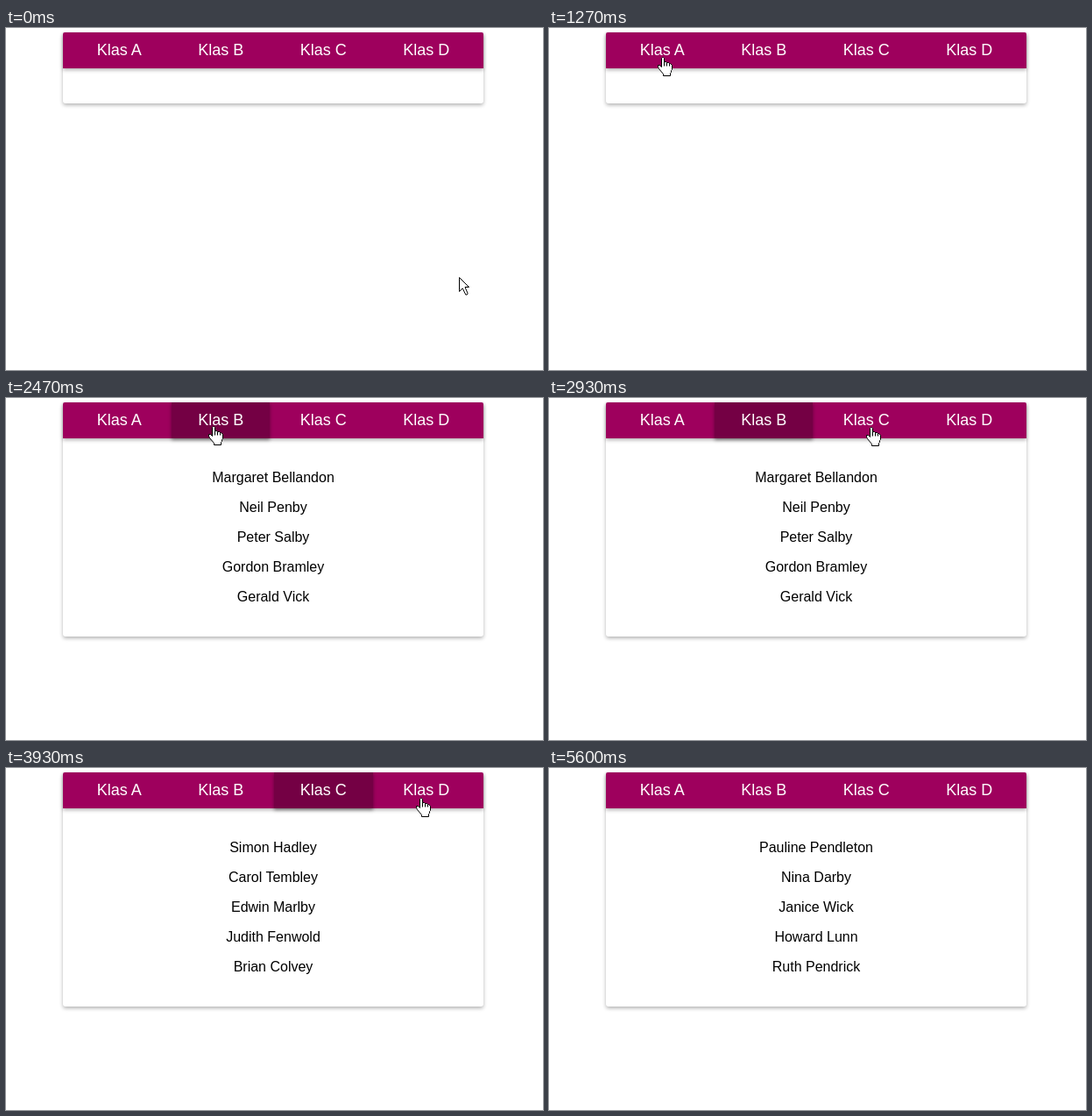
Recreate the animation shown at these times as an HTML page. Size 613x390 px, loop 5670 ms.

```html
<!DOCTYPE html>
<html lang="nl">
<head>
<meta charset="utf-8">
<title>Klassen</title>
<style>
  html, body { margin: 0; width: 100%; height: 100%; overflow: hidden; background: #fff; }
  body { position: relative; font-family: Arial, "Liberation Sans", sans-serif; }
  #card, #bar, svg { position: absolute; }
  #card, #bar { left: 65px; top: 5px; width: 480px; box-shadow: 0 2px 4px rgba(0,0,0,.3); }
  #card { height: 81px; border-radius: 3px; background: #fff; }
  #card.open { height: 267px; }
  #bar {
    display: flex; justify-content: center; gap: 4.45px;
    height: 41px; border-radius: 2px 2px 0 0; background: #9e005d;
  }
  #bar span { padding: 0 30px; font-size: 18px; line-height: 40px; color: #fff; white-space: nowrap; }
  #bar .on { background: #740044; box-shadow: 0 2px 4px rgba(0,0,0,.4); }
  #list { position: absolute; top: 61px; width: 100%; text-align: center; }
  #list p { margin: 16px 0; font-size: 16px; line-height: 18px; color: #000; }
  svg { left: 0; top: 0; width: 18px; height: 23px; overflow: visible; }
  path { fill: #fff; stroke: #000; stroke-width: 1; }
</style>
</head>
<body>
<div id="card"><div id="list"></div></div>
<div id="bar"><span>Klas A</span><span>Klas B</span><span>Klas C</span><span>Klas D</span></div>
<svg id="arrow"><path d="M.5 .5V16.5L4.2 12.8 7.8 20.2 9.5 20 10 18.5 7 11.5H11.5Z"/></svg>
<svg id="hand">
  <path d="M5.5 .5H6.5L7.5 1.5V5.5H9.5L10.5 6.5H12.5L13.5 7.5H14.5L16.5 9.5V14.5L15.5 15.5V17.5L14.5 18.5V21.5H6.5V19.5L1.5 13.5 .5 11.5V9.5H2.5L4.5 11.5V1.5Z"/>
  <path d="M7.5 5.5V10.5M10.5 6.5V10.5M13.5 7.5V10.5"/>
</svg>
<script>
const LOOP = 5670;
const TICK = 1000 / 15;         // the screen refreshes 15 times a second
const BAR_BOTTOM = 46;
const POINTER_GONE = 75, RELEASE = 84;   // ticks

const groups = [
  ["Robin Fenley", "Harriet Tunley", "Noel Hartson", "Molly Harbourn", "Luke Birtle"],
  ["Margaret Bellandon", "Neil Penby", "Peter Salby", "Gordon Bramley", "Gerald Vick"],
  ["Simon Hadley", "Carol Tembley", "Edwin Marlby", "Judith Fenwold", "Brian Colvey"],
  ["Pauline Pendleton", "Nina Darby", "Janice Wick", "Howard Lunn", "Ruth Pendrick"]
];

// Each tab is pressed, and its list shown, at a steady pace.
const pressTick = i => Math.round(21 + i * 44 / 3);
const showTick = i => 22 + i * 15;
const latest = (tickOf, tick) => groups.findLastIndex((_, i) => tickOf(i) <= tick);

const origin = { x: 517, y: 284 };
const moves = [
  { from: 0, to: 18, x: 129, y: 33 },
  { from: 26, to: 33, x: 236, y: 32 },
  { from: 38, to: 45, x: 373, y: 33 },
  { from: 51, to: 60, x: 476, y: 34 },
  { from: 68, to: 74, x: 543, y: 346, power: 1 }
];

function pointerAt(tick) {
  let { x, y } = origin;
  for (const { from, to, power = 1.6, ...end } of moves) {
    if (tick <= from) break;
    const left = Math.pow(1 - Math.min(1, (tick - from) / (to - from)), power);
    x = end.x + (x - end.x) * left;
    y = end.y + (y - end.y) * left;
  }
  return [Math.round(x), Math.round(y)];
}

const $ = id => document.getElementById(id);
const tabs = [...$("bar").children];

function place(el, x, y, visible) {
  el.style.transform = `translate(${x}px, ${y}px)`;
  el.style.visibility = visible ? "visible" : "hidden";
}

let group;
function showGroup(next) {
  if (next === group) return;
  group = next;
  $("card").classList.toggle("open", next >= 0);
  $("list").replaceChildren(...(groups[next] || []).map(name => {
    const row = document.createElement("p");
    row.textContent = name;
    return row;
  }));
}

function draw(time) {
  const tick = Math.floor((time + 5) / TICK);   // steps fall on times rounded to 10 ms
  const pressed = tick < RELEASE ? latest(pressTick, tick) : -1;
  tabs.forEach((tab, i) => tab.classList.toggle("on", i === pressed));
  showGroup(latest(showTick, tick));

  const [x, y] = pointerAt(tick);
  const onTab = y < BAR_BOTTOM, visible = tick < POINTER_GONE;
  place($("arrow"), x, y, visible && !onTab);
  place($("hand"), x - 5, y, visible && onTab);
}

const start = performance.now();
function loop() {
  draw((performance.now() - start) % LOOP);
  requestAnimationFrame(loop);
}
draw(0);
requestAnimationFrame(loop);
</script>
</body>
</html>
```
